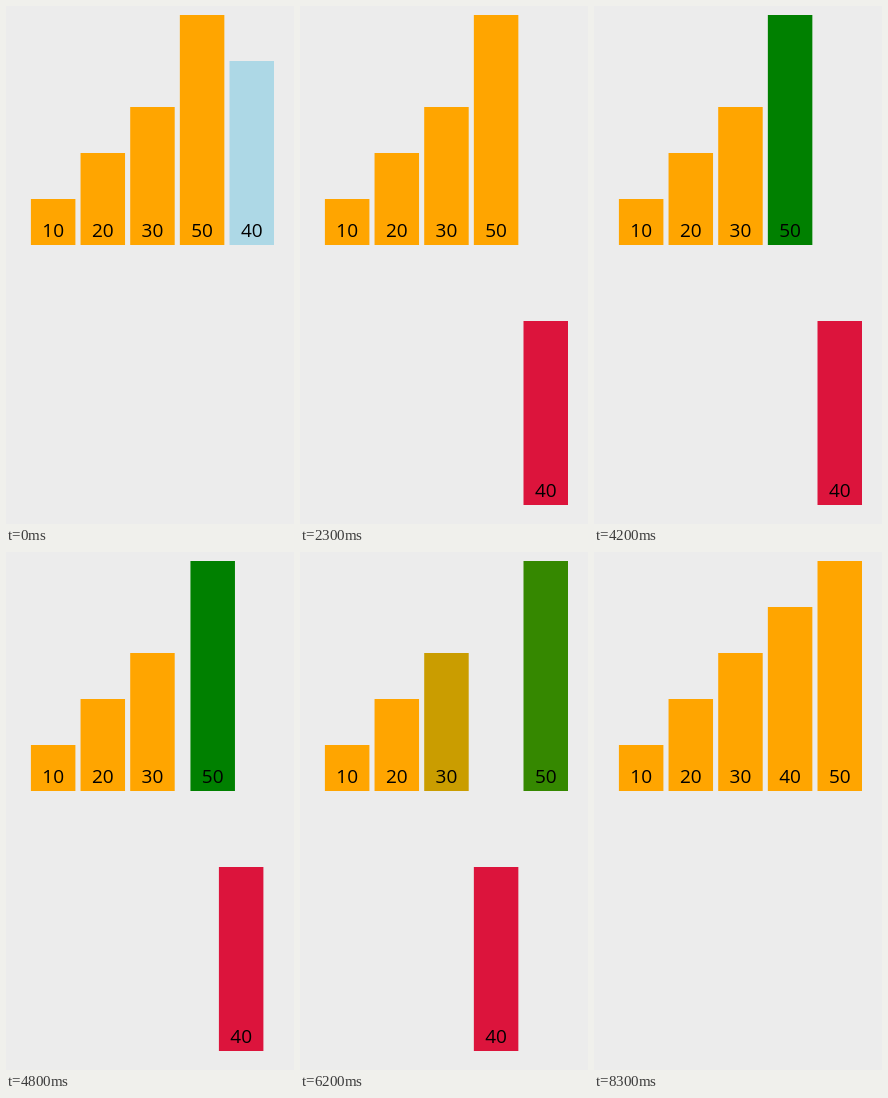
Animation, 288 px wide and 518 px high, one loop 9600 ms. Source, as an HTML page:

```html
<!DOCTYPE html>
<html lang="en">
<head>
<meta charset="utf-8">
<title>Insertion sort</title>
<style>
  html, body { margin: 0; width: 100%; height: 100%; overflow: hidden; background: #ececec; }
  svg { display: block; width: 288px; height: 518px; }
  text { font: 19px "Open Sans", "Noto Sans", sans-serif; text-anchor: middle; }
</style>
</head>
<body>
<svg viewBox="0 0 288 518"></svg>
<script>
const LOOP = 9600, STEP = 100, DURATION = 300;
const LEFT = 24.9, PITCH = 49.65, WIDTH = 44.5, FLOOR = 239, UNIT = 4.6, DROP = 260;
const ORANGE = [255, 165, 0], BLUE = [173, 216, 230], RED = [220, 20, 60], GREEN = [0, 128, 0];

const bars = [10, 20, 30, 50, 40].map((value, slot) => ({
  value,
  start: { slot, drop: 0, color: value === 40 ? BLUE : ORANGE }
}));

// Each move: start time, bar value, properties to reach.
const moves = [
  [1935, 40, { drop: 1, color: RED }],
  [3351, 50, { color: GREEN }],
  [4751, 50, { slot: 4 }],
  [4751, 40, { slot: 3 }],
  [6152, 50, { color: ORANGE }],
  [6152, 30, { color: GREEN }],
  [7576, 30, { color: ORANGE }],
  [7576, 40, { drop: 0, color: ORANGE }]
];

const svg = document.querySelector("svg");
function add(parent, tag, attributes = {}) {
  const node = document.createElementNS("http://www.w3.org/2000/svg", tag);
  for (const key in attributes) node.setAttribute(key, attributes[key]);
  return parent.appendChild(node);
}

for (const bar of bars) {
  const height = bar.value * UNIT;
  bar.group = add(svg, "g");
  bar.rect = add(bar.group, "rect", { y: FLOOR - height, width: WIDTH, height });
  add(bar.group, "text", { x: WIDTH / 2, y: FLOOR - 8 }).textContent = bar.value;
}

// cubic-bezier(.25, .1, .25, 1)
function ease(u) {
  if (u <= 0 || u >= 1) return u <= 0 ? 0 : 1;
  const curve = (s, a, b) => 3 * (1 - s) ** 2 * s * a + 3 * (1 - s) * s * s * b + s ** 3;
  let low = 0, high = 1;
  for (let i = 0; i < 24; i++) {
    const mid = (low + high) / 2;
    if (curve(mid, 0.25, 0.25) < u) low = mid; else high = mid;
  }
  return curve(low, 0.1, 1);
}

const mix = (a, b, k) => Array.isArray(a) ? a.map((v, i) => mix(v, b[i], k)) : a + (b - a) * k;

function draw(time) {
  for (const bar of bars) {
    const state = { ...bar.start };
    for (const [start, value, goal] of moves) {
      if (value !== bar.value) continue;
      const k = ease((time - start) / DURATION);
      for (const key in goal) state[key] = mix(state[key], goal[key], k);
    }
    const x = LEFT + state.slot * PITCH, y = state.drop * DROP;
    bar.group.setAttribute("transform", `translate(${x} ${y})`);
    bar.rect.setAttribute("fill", `rgb(${state.color.map(Math.round)})`);
  }
}

function tick() {
  // The motion advances at ten pictures per second.
  draw(Math.floor(performance.now() % LOOP / STEP) * STEP);
  requestAnimationFrame(tick);
}
tick();
</script>
</body>
</html>
```
